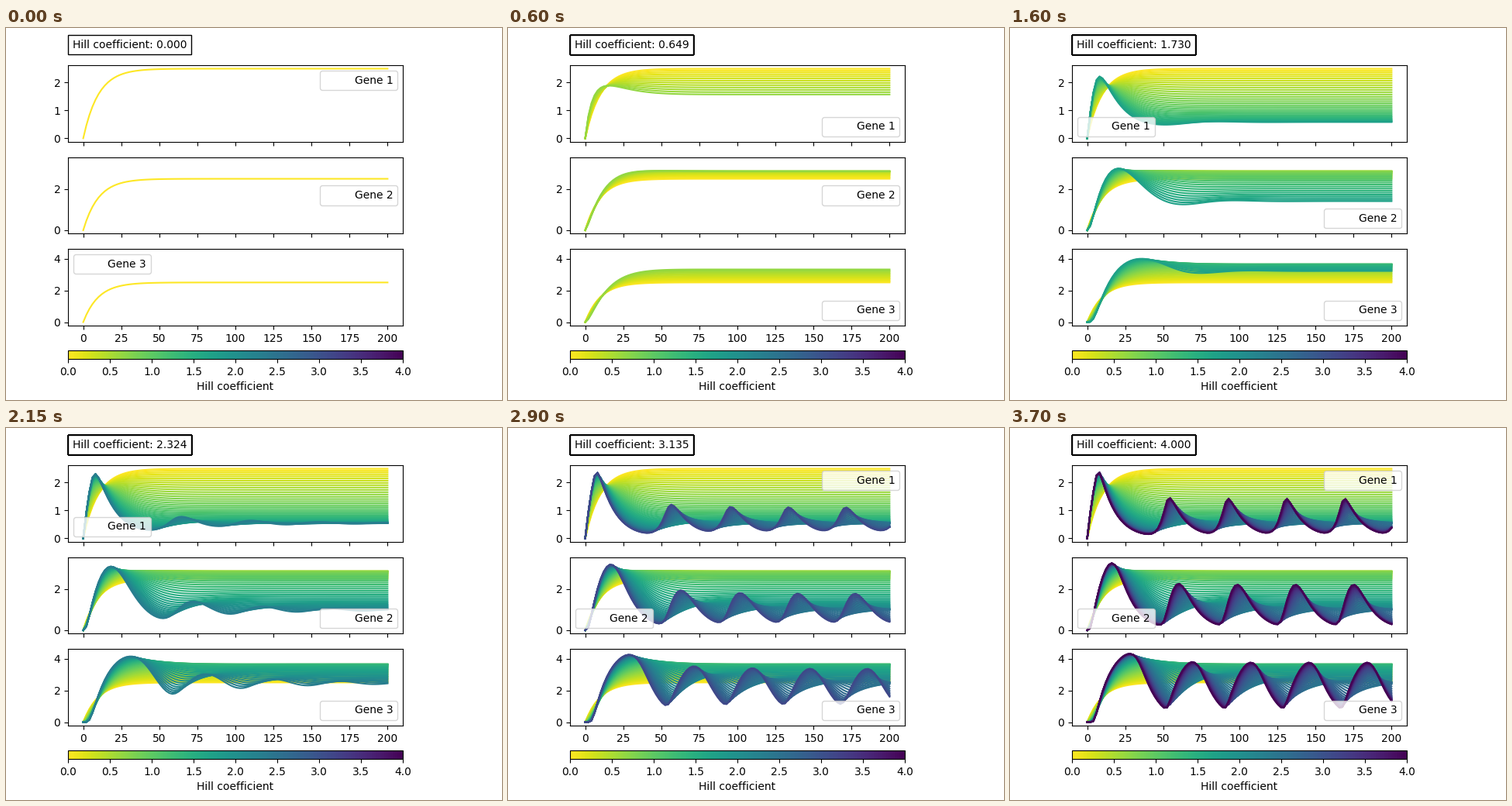
These frames come from a looping animation (640x480 px, 3.75 s). A matplotlib script:

```python
import numpy as np
import matplotlib.pyplot as plt
from matplotlib.animation import FuncAnimation
from matplotlib.cm import ScalarMappable
from matplotlib.colors import Normalize
from matplotlib.lines import Line2D

FRAMES = 75
INTERVAL = 50
BETA, GAMMA = 0.5, 0.1
STACK = 30  # text boxes kept on top of each other, darkening the border

hill = np.linspace(0, 4, FRAMES)
times = np.linspace(0, 200, 100)


def rates(x):
    """Gene 1 activates 2, 2 activates 3, and 3 represses 1."""
    p1, p2, p3 = x ** hill
    made = np.array([1 / (1 + p3), p1 / (1 + p1), p2 / (1 + p2)])
    return BETA * made - GAMMA * x


def simulate(substeps=40):
    """Integrate every Hill coefficient at once; shape (time, gene, hill)."""
    x = np.zeros((3, FRAMES))
    h = (times[1] - times[0]) / substeps
    path = [x]
    for _ in times[1:]:
        for _ in range(substeps):
            k1 = rates(x)
            k2 = rates(x + h / 2 * k1)
            k3 = rates(x + h / 2 * k2)
            k4 = rates(x + h * k3)
            x = x + h / 6 * (k1 + 2 * k2 + 2 * k3 + k4)
        path.append(x)
    return np.array(path)


levels = simulate()
norm = Normalize(0, 4)
cmap = plt.get_cmap("viridis_r")

fig, axes = plt.subplots(3, 1, sharex=True, figsize=(6.4, 4.8), dpi=100)
fig.subplots_adjust(left=0.125, right=0.8, bottom=0.2, top=0.9, hspace=0.2)

peaks = [2.5, 3.385, 4.39]
yticks = [[0, 1, 2], [0, 2], [0, 2, 4]]

# (first frame, place) for each legend
places = [
    [(0, "upper right"), (2, "right"), (12, "lower right"),
     (26, "lower left"), (46, "upper right")],
    [(0, "right"), (24, "lower right"), (49, "lower left")],
    [(0, "upper left"), (10, "lower right")],
]

curves, legends = [], []
for gene, ax in enumerate(axes):
    curves.append([
        ax.plot(times, levels[:, gene, k], color=cmap(norm(n)), lw=1.5)[0]
        for k, n in enumerate(hill)
    ])
    ax.set_xlim(-10, 210)
    ax.set_ylim(-0.05 * peaks[gene], 1.05 * peaks[gene])
    ax.set_xticks(range(0, 201, 25))
    ax.set_yticks(yticks[gene])
    blank = Line2D([], [], color="none")
    legends.append(ax.legend([blank], [f"Gene {gene + 1}"],
                             loc=places[gene][0][1]))

labels = [
    axes[0].text(-7, 3.25, f"Hill coefficient: {n:.3f}",
                 bbox=dict(facecolor="white"))
    for n in hill
]

cax = fig.add_axes([0.125, 53 / 480, 0.675, 11 / 480])
bar = fig.colorbar(ScalarMappable(norm, cmap), cax=cax,
                   orientation="horizontal", ticks=np.arange(0, 4.1, 0.5))
bar.set_label("Hill coefficient")


def update(i):
    for gene in range(3):
        for k, line in enumerate(curves[gene]):
            line.set_visible(k <= i)
        spot = [place for start, place in places[gene] if start <= i][-1]
        legends[gene].set_loc(spot)
    for k, label in enumerate(labels):
        label.set_visible(i - STACK < k <= i)
    return []


anim = FuncAnimation(fig, update, frames=FRAMES, interval=INTERVAL,
                     repeat=True, repeat_delay=0, blit=False)
plt.show()
```
